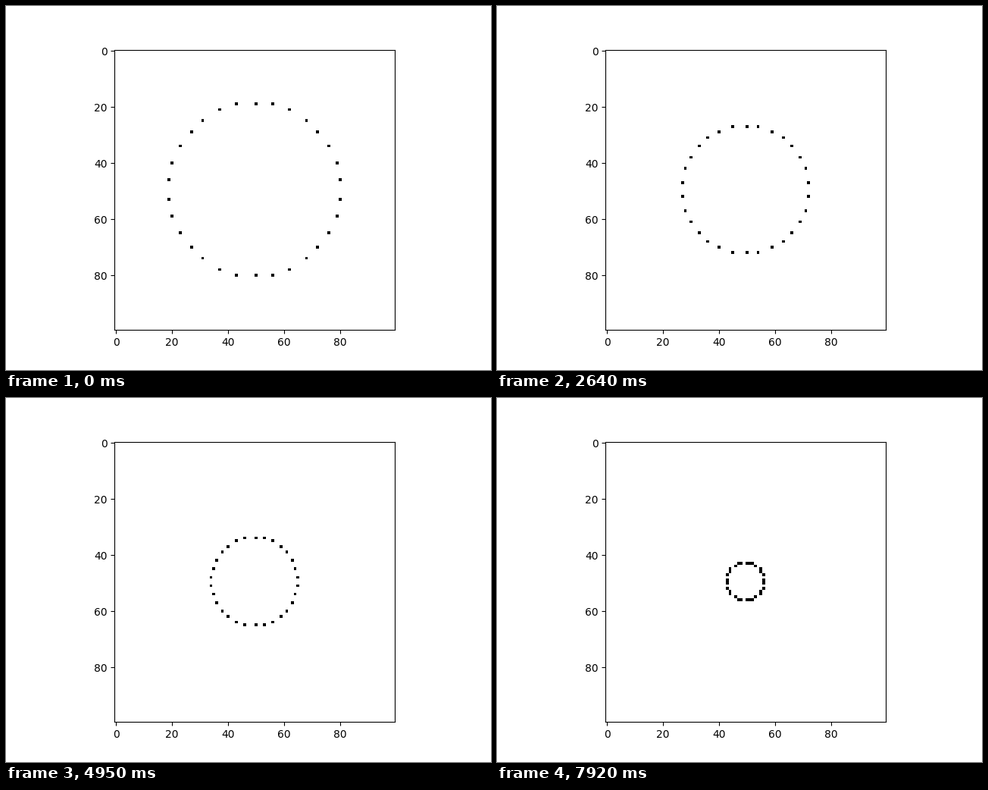
These frames come from a looping animation (640x480 px, 8 s). A matplotlib script:

```python
import numpy as np
import matplotlib.pyplot as plt
from matplotlib.animation import FuncAnimation

SIZE = 100
CENTER = 50
DOTS = 30
START_RADIUS = 30.769
STEP_MS = 330
INTERVAL = 20
LOOP_MS = 8000

angles = np.arange(DOTS) * 2 * np.pi / DOTS


def ring(radius):
    """White grid with black cells along a circle."""
    grid = np.ones((SIZE, SIZE))
    x = np.floor(np.round(CENTER + radius * np.sin(angles), 9)).astype(int)
    y = np.floor(np.round(CENTER - radius * np.cos(angles), 9)).astype(int)
    grid[y, x] = 0
    return grid


fig, ax = plt.subplots(figsize=(6.4, 4.8), dpi=100)
image = ax.imshow(ring(START_RADIUS), cmap="gray", vmin=0, vmax=1)


def update(frame):
    # Half an interval of lead rounds each step to the nearest tick.
    step = (frame * INTERVAL + INTERVAL // 2) // STEP_MS
    image.set_data(ring(START_RADIUS - step))
    return (image,)


anim = FuncAnimation(fig, update, frames=LOOP_MS // INTERVAL,
                     interval=INTERVAL, repeat=True, repeat_delay=0)
plt.show()
```
